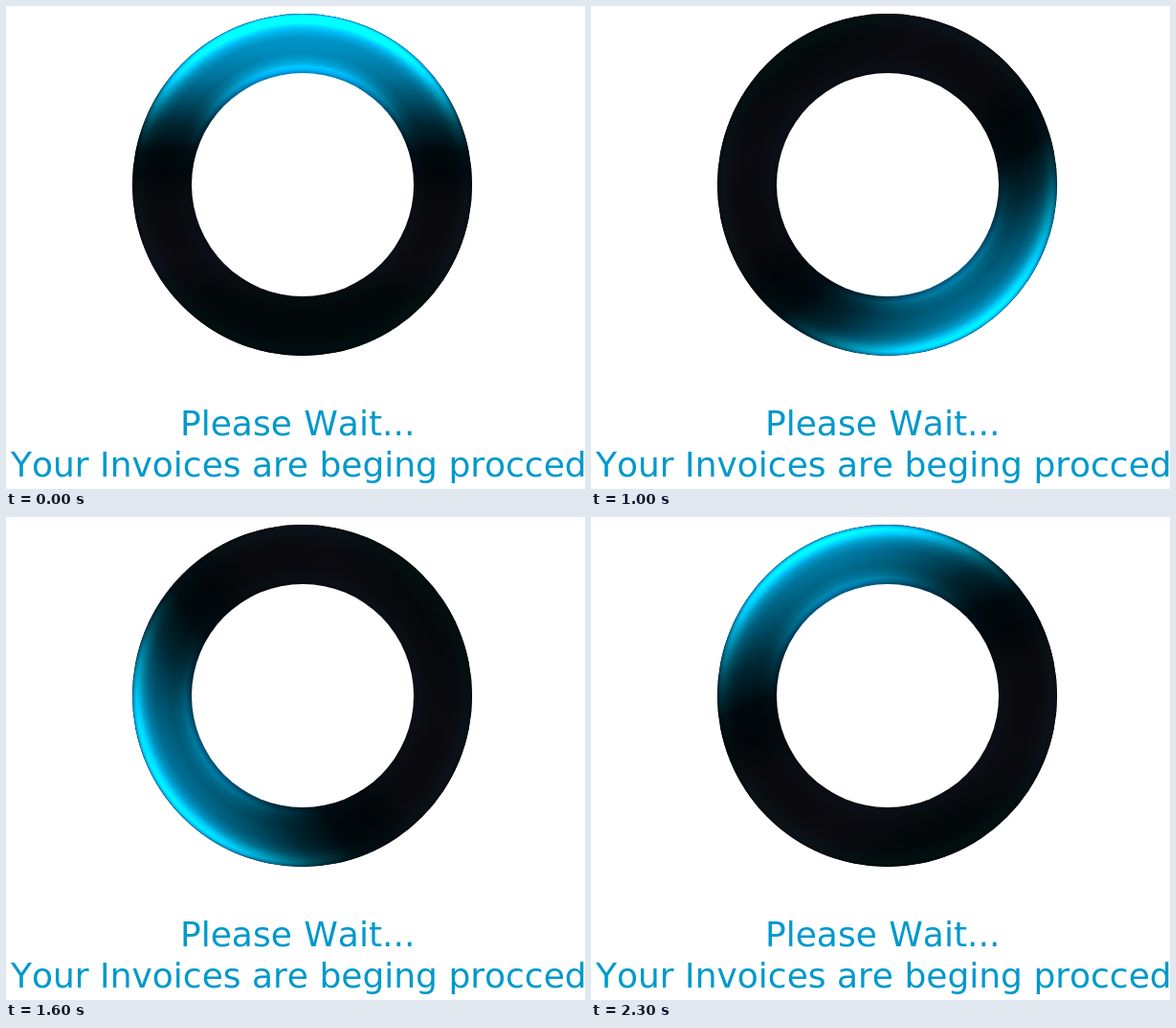
Recreate the animation shown at these times as an HTML page. Size 605x504 px, loop 2.4 s.

```html
<!DOCTYPE html>
<html lang="en">
<head>
<meta charset="utf-8">
<title>Please Wait</title>
<style>
  /* Light direction = quarter turn + uneven lean inside that quarter */
  @property --quarter { syntax: "<angle>"; inherits: true; initial-value: 0deg; }
  @property --lean { syntax: "<angle>"; inherits: true; initial-value: 0deg; }

  html, body { margin: 0; width: 100%; height: 100%; overflow: hidden; background: #fff; }

  .ring, .ring::before, .ring::after { position: absolute; border-radius: 50%; }

  .ring {
    left: 132px;
    top: 8px;
    width: 355px;
    height: 357px;
    isolation: isolate;
    background: linear-gradient(calc(180deg + var(--quarter) + var(--lean)),
      #009bd0 0%, #0098cc 6%, #008ab9 12%, #00769e 18%, #00506a 25%, #002632 32%,
      #00090d 40%, #020609 47%, #09090c 55%, #0b0a0f 72%, #030809 84%, #01070a 100%);
    animation: quarter 2400ms steps(4) infinite, lean 600ms step-end infinite;
  }

  /* Glossy rims: dodging brightens only the lit part */
  .ring::before {
    content: "";
    inset: 0;
    mix-blend-mode: color-dodge;
    background: radial-gradient(closest-side,
      #001018 65%, #004c58 67%, #00605c 69%, #003430 72%, #000 77%,
      #000 86%, #00302a 91%, #006c60 95%, #007c70 97.5%, #005c58 99%, #000 100%);
  }

  .ring::after {
    content: "";
    left: 61.5px;
    top: 61.5px;
    width: 232px;
    height: 233px;
    background: #fff;
  }

  @keyframes quarter { to { --quarter: 360deg; } }

  @keyframes lean {
    0% { --lean: 0deg; }
    16.6667% { --lean: 23deg; }
    33.3333% { --lean: 34deg; }
    50% { --lean: 45deg; }
    66.6667% { --lean: 56deg; }
    83.3333% { --lean: 67deg; }
    100% { --lean: 90deg; }
  }

  svg { position: absolute; left: 0; top: 0; }
  text { font: 36px "DejaVu Sans", Verdana, sans-serif; font-kerning: none; fill: #0099cc; }
  .wait { word-spacing: 1px; }
</style>
</head>
<body>
  <div class="ring"></div>
  <svg width="605" height="504">
    <text class="wait" x="182" y="448">Please Wait...</text>
    <text x="5" y="491">Your Invoices are beging procced</text>
  </svg>
</body>
</html>
```
